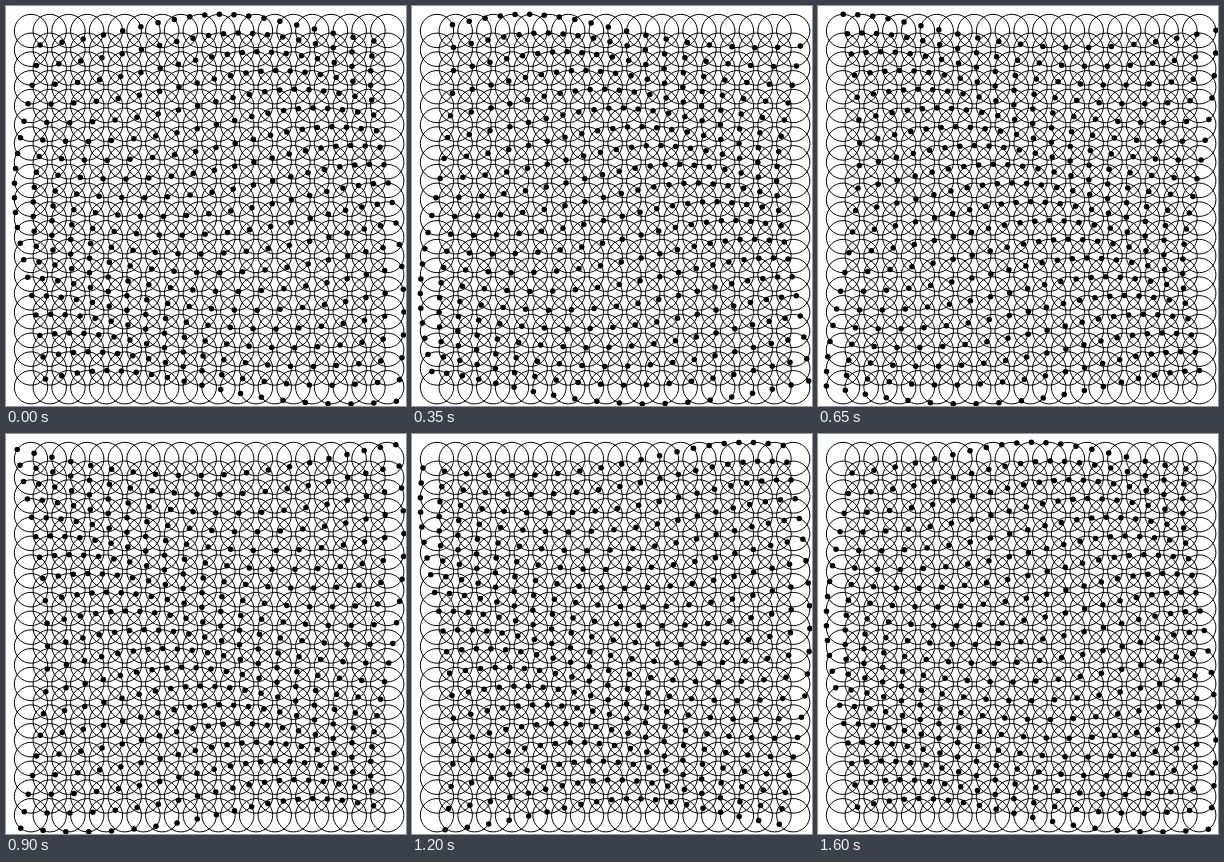
An HTML page with a canvas for the animation above (1.65 s loop, 400 by 400 pixels).

```html
<!DOCTYPE html>
<html lang="en">
<head>
<meta charset="utf-8">
<title>Circling dots</title>
<style>
html, body { margin: 0; width: 100%; height: 100%; overflow: hidden; background: #fff; }
canvas { display: block; width: 400px; height: 400px; }
</style>
</head>
<body>
<canvas id="stage" width="400" height="400"></canvas>
<script>
const ctx = document.getElementById('stage').getContext('2d');
const COUNT = 20, START = 25, GAP = 18.75;
const ORBIT = 16.67, DOT = 2.75;
const STEP_MS = 50, STEPS = 33;
const TAU = Math.PI * 2;
const SHIFT = TAU / 25;          // phase between neighbours
const TURN = TAU / 32;           // rotation per step; the last step repeats the first
const PHASE = 57 * Math.PI / 180;

function eachCell(draw) {
  for (let row = 0; row < COUNT; row++) {
    for (let col = 0; col < COUNT; col++) {
      draw(START + col * GAP, START + row * GAP, row - col);
    }
  }
}

function circle(x, y, r) {
  ctx.beginPath();
  ctx.arc(x, y, r, 0, TAU);
}

function render(step) {
  ctx.fillStyle = '#fff';
  ctx.fillRect(0, 0, 400, 400);
  ctx.strokeStyle = ctx.fillStyle = '#000';
  ctx.lineWidth = 1;
  eachCell((x, y) => {
    circle(x, y, ORBIT);
    ctx.stroke();
  });
  eachCell((x, y, diagonal) => {
    const a = PHASE + diagonal * SHIFT - step * TURN;
    circle(x + ORBIT * Math.cos(a), y + ORBIT * Math.sin(a), DOT);
    ctx.fill();
  });
}

const begin = performance.now();
let shown = 0;
render(0);

function tick() {
  const step = Math.floor((performance.now() - begin) / STEP_MS) % STEPS;
  if (step !== shown) render(shown = step);
  requestAnimationFrame(tick);
}
requestAnimationFrame(tick);
</script>
</body>
</html>
```
